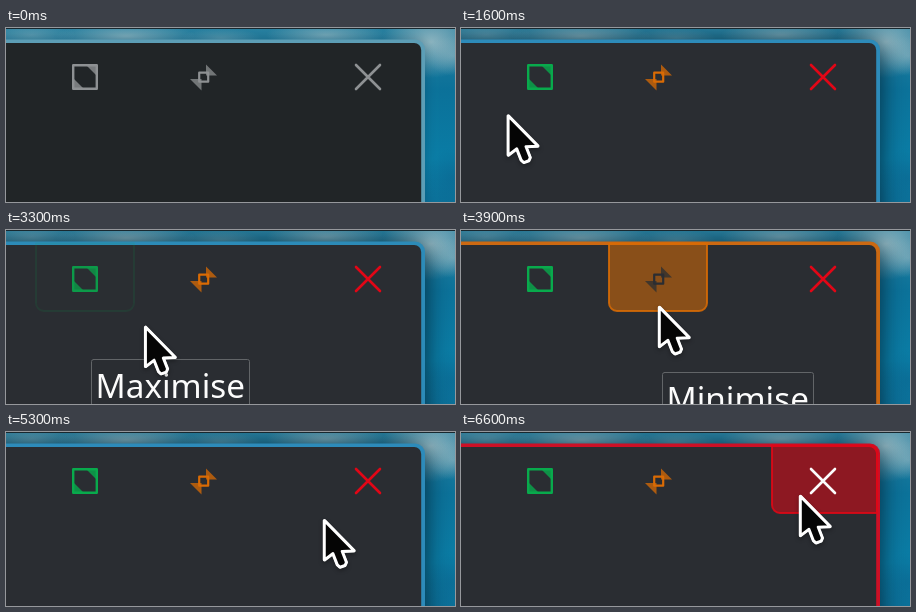
Animation of 449x174 px, one loop 6900 ms. Source, as an HTML page with a canvas:

```html
<!DOCTYPE html>
<html lang="en">
<head>
<meta charset="utf-8">
<title>Window buttons</title>
<style>
  html, body { margin: 0; width: 100%; height: 100%; overflow: hidden; background: #202427; }
  canvas { display: block; width: 449px; height: 174px; }
</style>
</head>
<body>
<canvas id="stage" width="449" height="174"></canvas>
<script>
const W = 449, H = 174, LOOP = 6900, STEP = 100;
const ctx = document.getElementById('stage').getContext('2d');

const GREEN = [8, 170, 76], ORANGE = [218, 107, 4], RED = [226, 6, 22];
const GREY = [142, 145, 147], WHITE = [252, 252, 252];
const BG_IDLE = [33, 37, 39], BG = [42, 45, 50];
const EDGE_IDLE = [92, 158, 182], EDGE = [45, 139, 186];

const clamp = v => Math.max(0, Math.min(1, v));
const mix = (a, b, k) => a.map((v, i) => v + (b[i] - v) * k);
const css = (c, a = 1) => `rgba(${c.map(Math.round).join(',')},${a})`;

// Linear interpolation through [time, value] pairs
function track(t, keys) {
  if (t <= keys[0][0]) return keys[0][1];
  for (let i = 1; i < keys.length; i++) {
    const [t0, v0] = keys[i - 1], [t1, v1] = keys[i];
    if (t <= t1) return v0 + (v1 - v0) * (t - t0) / (t1 - t0);
  }
  return keys[keys.length - 1][1];
}

const hoverKeys = {
  max: [[1800, 0], [1900, .2], [2000, .65], [2100, 1], [3100, 1], [3200, .6], [3300, .13], [3400, 0]],
  min: [[3600, 0], [3700, .2], [3800, .65], [3900, 1], [4900, 1], [5000, .6], [5100, .13], [5200, 0]],
  close: [[5400, 0], [5500, .5], [5600, .93], [6400, .93], [6600, 1]]
};

// Pointer travel: start time, from, to, sideways bulge
const legs = [
  [1200, [-31, 133], [82, 67], 0],
  [3000, [82, 67], [198, 77], 25],
  [4800, [198, 77], [339, 64], 44]
];

function pointerAt(t) {
  const leg = legs.filter(l => t >= l[0]).pop();
  if (!leg) return null;
  const [start, a, b, bulge] = leg;
  const u = Math.pow(clamp((t - start) / 700), .83);
  const s = u * u * (3 - 2 * u);
  const [x, y] = mix(a, b, s);
  return [x, y + 4 * bulge * s * (1 - s)];
}

function poly(points) {
  ctx.beginPath();
  points.forEach(([x, y], i) => i ? ctx.lineTo(x, y) : ctx.moveTo(x, y));
  ctx.closePath();
}

function glow(x, y, rx, ry, color, alpha) {
  ctx.save();
  ctx.translate(x, y);
  ctx.scale(rx, ry);
  const g = ctx.createRadialGradient(0, 0, 0, 0, 0, 1);
  g.addColorStop(0, css(color, alpha));
  g.addColorStop(1, css(color, 0));
  ctx.fillStyle = g;
  ctx.fillRect(-1, -1, 2, 2);
  ctx.restore();
}

function wallpaper() {
  const g = ctx.createLinearGradient(0, 0, 0, H);
  g.addColorStop(0, '#287f9f');
  g.addColorStop(.35, '#0b7199');
  g.addColorStop(.75, '#0a7ca5');
  g.addColorStop(1, '#0b7099');
  ctx.fillStyle = g;
  ctx.fillRect(0, 0, W, H);
  const cloud = [176, 198, 202];
  glow(25, 7, 45, 14, cloud, .35);
  glow(120, 8, 70, 14, cloud, .6);
  glow(215, 10, 40, 10, cloud, .3);
  glow(320, 7, 60, 14, cloud, .55);
  glow(425, 14, 50, 36, cloud, .75);
  glow(447, 28, 26, 20, cloud, .35);
  glow(447, 150, 26, 30, [10, 100, 142], .5);
}

function frameWindow(focus, bg, edge) {
  ctx.save();
  ctx.shadowColor = `rgba(0,10,20,${.2 + .5 * focus})`;
  ctx.shadowBlur = 12 + 12 * focus;
  ctx.shadowOffsetY = 3 * focus;
  ctx.fillStyle = css(edge);
  ctx.beginPath();
  ctx.roundRect(-40, 11.5, 459, 240, 10);
  ctx.fill();
  ctx.restore();
  ctx.fillStyle = css(bg);
  ctx.beginPath();
  ctx.roundRect(-40, 15, 455.2, 240, 7);
  ctx.fill();
}

function tab(x, right, radii, color, k) {
  if (k <= 0) return;
  ctx.beginPath();
  ctx.roundRect(x + 1, 13.5, right - x - 2, 67.5, radii);
  ctx.fillStyle = css(color, .54 * k * k);
  ctx.fill();
  ctx.strokeStyle = css(color, .85 * k);
  ctx.lineWidth = 2;
  ctx.stroke();
}

function maxIcon(color) {
  ctx.strokeStyle = css(color);
  ctx.lineWidth = 2.4;
  ctx.lineJoin = 'round';
  ctx.strokeRect(67.2, 37.2, 23.6, 23.6);
  ctx.fillStyle = css(color, .8);
  poly([[81, 38], [90, 38], [90, 47]]);
  ctx.fill();
  poly([[68, 51], [68, 60], [77, 60]]);
  ctx.fill();
}

function minIcon(color) {
  ctx.fillStyle = css(color, .75);
  poly([[200, 36.5], [211, 47.5], [200, 47.5]]);
  ctx.fill();
  poly([[184, 51], [195.5, 51], [195.5, 62.5]]);
  ctx.fill();
  ctx.strokeStyle = css(color);
  ctx.lineWidth = 2.2;
  ctx.strokeRect(193.2, 44.7, 9, 9);
}

function closeIcon(color) {
  ctx.strokeStyle = css(color);
  ctx.lineWidth = 2.6;
  ctx.lineCap = 'round';
  ctx.beginPath();
  ctx.moveTo(350, 37);
  ctx.lineTo(374, 61);
  ctx.moveTo(374, 37);
  ctx.lineTo(350, 61);
  ctx.stroke();
}

function tooltip(text, x, y, width) {
  ctx.beginPath();
  ctx.roundRect(x + .5, y + .5, width - 1, 60, 2);
  ctx.fillStyle = css(BG);
  ctx.fill();
  ctx.strokeStyle = '#626568';
  ctx.lineWidth = 1;
  ctx.stroke();
  ctx.fillStyle = css(WHITE);
  ctx.font = '33.3px "Noto Sans", "Open Sans", sans-serif';
  ctx.fillText(text, x + 4.5, y + 39);
}

function pointer([x, y]) {
  ctx.save();
  ctx.translate(x, y);
  ctx.shadowColor = 'rgba(0,0,0,.35)';
  ctx.shadowBlur = 4;
  ctx.shadowOffsetY = 2;
  poly([[0.5, 0.5], [0.5, 39.5], [9, 33], [13.5, 44.5], [16, 46.8], [21, 45], [22.3, 42], [18, 31], [30, 30.5]]);
  ctx.lineJoin = 'round';
  ctx.lineWidth = 3.4;
  ctx.strokeStyle = '#fff';
  ctx.stroke();
  ctx.shadowColor = 'transparent';
  ctx.fillStyle = '#050505';
  ctx.fill();
  ctx.lineWidth = 2.6;
  ctx.stroke();
  ctx.restore();
}

function draw(t) {
  const focus = track(t, [[700, 0], [1000, 1]]);
  const max = track(t, hoverKeys.max);
  const min = track(t, hoverKeys.min);
  const close = track(t, hoverKeys.close);

  const bg = mix(BG_IDLE, BG, focus);
  let edge = mix(EDGE_IDLE, EDGE, focus);
  edge = mix(edge, [12, 148, 72], max * max);
  edge = mix(edge, [204, 105, 18], min * min);
  edge = mix(edge, [204, 16, 38], close * close);

  wallpaper();
  frameWindow(focus, bg, edge);
  ctx.fillStyle = '#18282f';
  ctx.fillRect(0, 0, W, 1);

  tab(29, 129, [0, 0, 8, 8], GREEN, max);
  tab(147, 247, [0, 0, 8, 8], ORANGE, min);
  tab(310, 417, [0, 8, 0, 8], RED, close);

  const tint = (color, over, k) => mix(mix(GREY, color, focus), over, k);
  maxIcon(tint(GREEN, BG, max));
  minIcon(tint(ORANGE, BG, min));
  closeIcon(tint(RED, WHITE, close));

  if (t >= 2500 && t < 3800) tooltip('Maximise', 85, 129, 159);
  if (t >= 3800 && t < 5100) tooltip('Minimise', 201, 142, 152);

  const pos = pointerAt(t);
  if (pos) pointer(pos);
}

const origin = performance.now();
function tick() {
  const t = (performance.now() - origin) % LOOP;
  draw(Math.floor(t / STEP) * STEP);
  requestAnimationFrame(tick);
}
tick();
</script>
</body>
</html>
```
